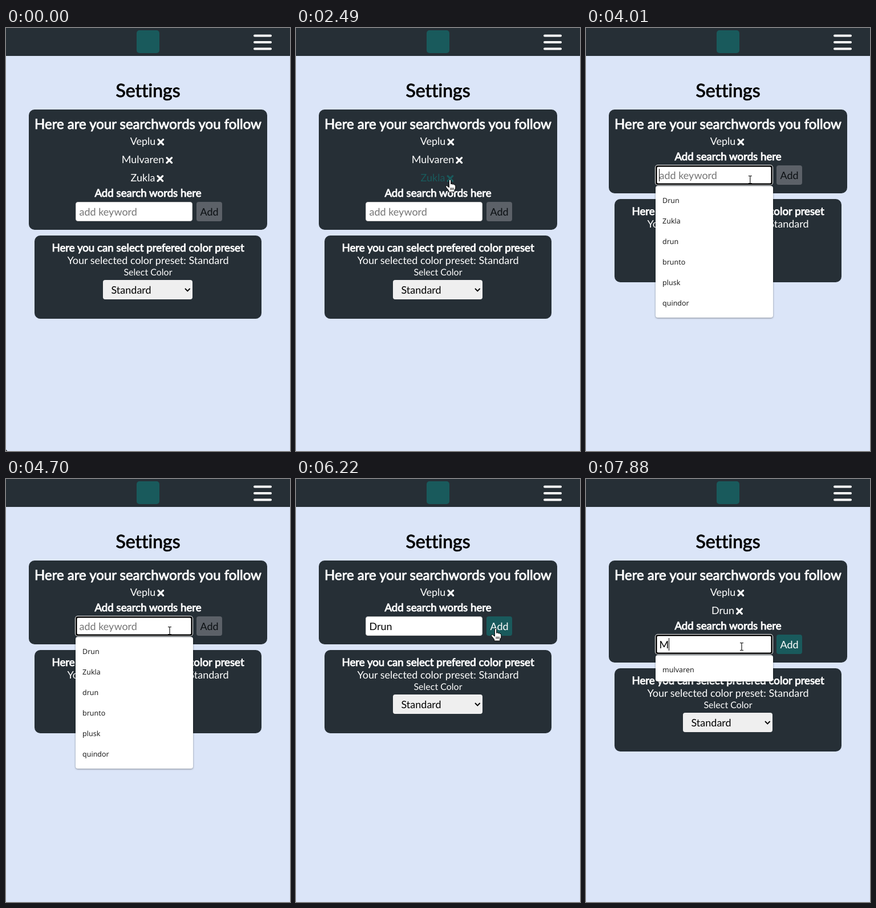
An HTML page for the animation above (8 s loop, 498x742 px).

```html
<!DOCTYPE html>
<html lang="en">
<head>
<meta charset="utf-8">
<title>Settings</title>
<style>
  html, body { margin: 0; width: 100%; height: 100%; overflow: hidden; background: #dbe5f8; }
  svg {
    display: block; width: 498px; height: 742px;
    font-family: Lato, sans-serif; font-size: 18px;
    font-variant-ligatures: none; text-rendering: geometricPrecision;
  }
  .list { font: 12.5px "Noto Sans", "Open Sans", sans-serif; }
  .menu { filter: drop-shadow(0 1px 1.5px rgba(0, 0, 0, .4)); }
</style>
</head>
<body>
<svg id="stage" viewBox="0 0 498 742"></svg>
<script>
const LOOP = 8000, STEP = 138.3;
const DARK = '#262f36', TEAL = '#195a5c', WHITE = '#fff';
const HISTORY = ['Drun', 'Zukla', 'drun', 'brunto', 'plusk', 'quindor', 'mulvaren'];
const stage = document.getElementById('stage');
const pen = document.createElement('canvas').getContext('2d');

// Pointer path: step, x, y, shape held from that step on
const PATH = [
  [0, 0, 740, 'arrow'], [3, 0, 740, 'arrow'], [4, 4, 690, 'arrow'], [5, 14, 632, 'arrow'],
  [6, 88, 555, 'arrow'], [8, 262, 545, 'arrow'], [10, 339, 464, 'arrow'], [12, 336, 455, 'arrow'],
  [17, 270, 266, 'hand'], [20, 270, 265, 'arrow'], [24, 293, 235, 'hand'], [27, 293, 235, 'arrow'],
  [28, 288, 266, 'beam'], [40, 286, 266, 'beam'], [42, 292, 265, 'beam'], [43, 350, 262, 'hand'],
  [46, 350, 262, 'arrow'], [47, 296, 288, 'beam'], [48, 269, 294, 'beam'], [50, 269, 294, 'beam'],
  [54, 273, 294, 'beam'], [58, 273, 294, 'beam']
];

const SHAPES = {
  arrow: '<path d="M0 0V16.5L3.8 13L6.4 19L9 17.9L6.4 12H11.6Z" fill="#fff" stroke="#000"/>',
  hand: `<path d="M-1.6 1.2Q0 -1 1.7 1.2V8.2Q3.4 6.6 4.7 8.6Q6.4 7.4 7.6 9.4Q9.8 8.8 9.8 11.4V15.5L7.8 19V22H-2.4V19.4
    L-7.4 13.2Q-8.2 10.6 -5.4 11L-1.6 14Z" fill="#fff" stroke="#000" stroke-linejoin="round"/>
    <path d="M1.2 14.5V18.5M3.6 14.5V18.5M6 14.5V18.5" stroke="#000"/>`,
  beam: '<path d="M-3 -6.5H-.8L0 -6L.8 -6.5H3M0 -6V6M-3 6.5H-.8L0 6L.8 6.5H3" fill="none" stroke="#000" stroke-width="1.1"/>'
};

const rect = (x, y, w, h, r, fill, extra = '') =>
  `<rect x="${x}" y="${y}" width="${w}" height="${h}" rx="${r}" fill="${fill}" ${extra}/>`;
const text = (s, x, y, fill, extra = '') => `<text x="${x}" y="${y}" fill="${fill}" ${extra}>${s}</text>`;
const centred = (s, y, fill, size = 18, extra = '') =>
  text(s, 249, y, fill, `text-anchor="middle" font-size="${size}" ${extra}`);
const heading = (s, y, fill, size) =>
  centred(s, y, fill, size, `stroke="${fill}" stroke-width=".9"`);

function width(s) {
  pen.font = '18px Lato, sans-serif';
  pen.textRendering = 'geometricPrecision';
  return pen.measureText(s).width;
}

function stateAt(n) {
  const rows = n < 20 ? ['Veplu', 'Mulvaren', 'Zukla']
    : n < 27 ? ['Veplu', 'Mulvaren']
    : n < 46 ? ['Veplu'] : ['Veplu', 'Drun'];
  const hover = n >= 17 && n < 20 ? 2 : n >= 24 && n < 27 ? 1 : -1;
  const typed = n < 46 ? 'Drun'.slice(0, Math.max(0, n - 34)) : n >= 56 ? 'M' : '';
  const focus = n >= 29 && n < 44 || n >= 48;
  const since = [56, 48, 38, 29].find(s => n >= s);
  return { rows, hover, typed, focus, caret: focus && Math.floor((n - since) / 4) % 2 === 0 };
}

function header() {
  const bars = [13.57, 25, 36.43].map(y => rect(434, y - 2, 32, 4, 2, WHITE)).join('');
  return rect(0, 0, 498, 49, 0, DARK) + rect(229, 4, 40, 40, 5, TEAL) + bars +
    heading('Settings', 121, '#000', 32);
}

function keyword(word, i, hot) {
  const w = width(word), x = 248 - (w + 16) / 2, y = 205 + 32 * i;
  const fill = hot ? TEAL : WHITE, cx = x + w + 9, cy = y - 5;
  return text(word, x, y, fill) +
    `<path d="M${cx - 4.3} ${cy - 4.3}l8.6 8.6m0 -8.6l-8.6 8.6" stroke="${fill}" stroke-width="3.3" stroke-linecap="round"/>`;
}

function field(s, y) {
  const box = s.focus
    ? rect(121, y - 1, 207, 36, 5, WHITE) + rect(122, y, 205, 34, 4, '#000') + rect(124.5, y + 2.5, 200, 29, 2, WHITE)
    : rect(122.5, y + .5, 204, 33, 3.5, WHITE, 'stroke="#ccc"');
  const label = s.typed ? text(s.typed, 128.5, y + 24, '#000') : text('add keyword', 128.5, y + 24, '#757575');
  const caret = s.caret ? rect(128 + Math.round(width(s.typed)), y + 6, 1, 22, 0, '#000') : '';
  const button = rect(334, y, 45, 34, 4, s.typed ? TEAL : '#5c6168') +
    text('Add', 356.5, y + 24, s.typed ? WHITE : '#0b0f12', 'text-anchor="middle"');
  return box + label + caret + button;
}

function presetPanel(y) {
  return rect(50, y, 398, 146, 10, DARK) +
    heading('Here you can select prefered color preset', y + 28, WHITE, 18.72) +
    centred('Your selected color preset: Standard', y + 50, WHITE) +
    centred('Select Color', y + 70, WHITE, 16) +
    rect(170, y + 78, 157, 34, 4, '#efefef') + text('Standard', 184.5, y + 102, '#000') +
    `<path d="M314 ${y + 93}l4.3 4.3l4.3 -4.3" fill="none" stroke="#000" stroke-width="1.9"/>`;
}

function suggestions(s, y) {
  if (!s.focus) return '';
  const found = HISTORY.filter(h => h.toLowerCase().startsWith(s.typed.toLowerCase())).slice(0, 6);
  const h = found.length > 1 ? 15 + 36 * found.length : 46;
  return rect(122, y, 206, h, 4, WHITE, 'class="menu"') +
    found.map((f, i) => text(f, 134, y + 30 + 36 * i, '#1f1f1f', 'class="list"')).join('');
}

function pointer(n) {
  let i = PATH.length - 2;
  while (PATH[i][0] > n) i--;
  const [n0, x0, y0, shape] = PATH[i], [n1, x1, y1] = PATH[i + 1];
  const k = (n - n0) / (n1 - n0);
  return `<g transform="translate(${x0 + (x1 - x0) * k} ${y0 + (y1 - y0) * k})">${SHAPES[shape]}</g>`;
}

function draw(n) {
  const s = stateAt(n), drop = 32 * s.rows.length;
  stage.innerHTML = rect(0, 0, 498, 742, 0, '#dbe5f8') + header() +
    rect(40, 143, 418, 115 + drop, 10, DARK) +
    heading('Here are your searchwords you follow', 177, WHITE, 24) +
    s.rows.map((r, i) => keyword(r, i, i === s.hover)).join('') +
    heading('Add search words here', 200 + drop, WHITE, 18.72) +
    field(s, 209 + drop) + presetPanel(268 + drop) + suggestions(s, 245 + drop) + pointer(n);
}

let start, last = -1;
function tick(now) {
  start ??= now;
  const n = Math.floor(((now - start) % LOOP + 4) / STEP);
  if (n !== last) draw(last = n);
  requestAnimationFrame(tick);
}
draw(0);
requestAnimationFrame(tick);
</script>
</body>
</html>
```
